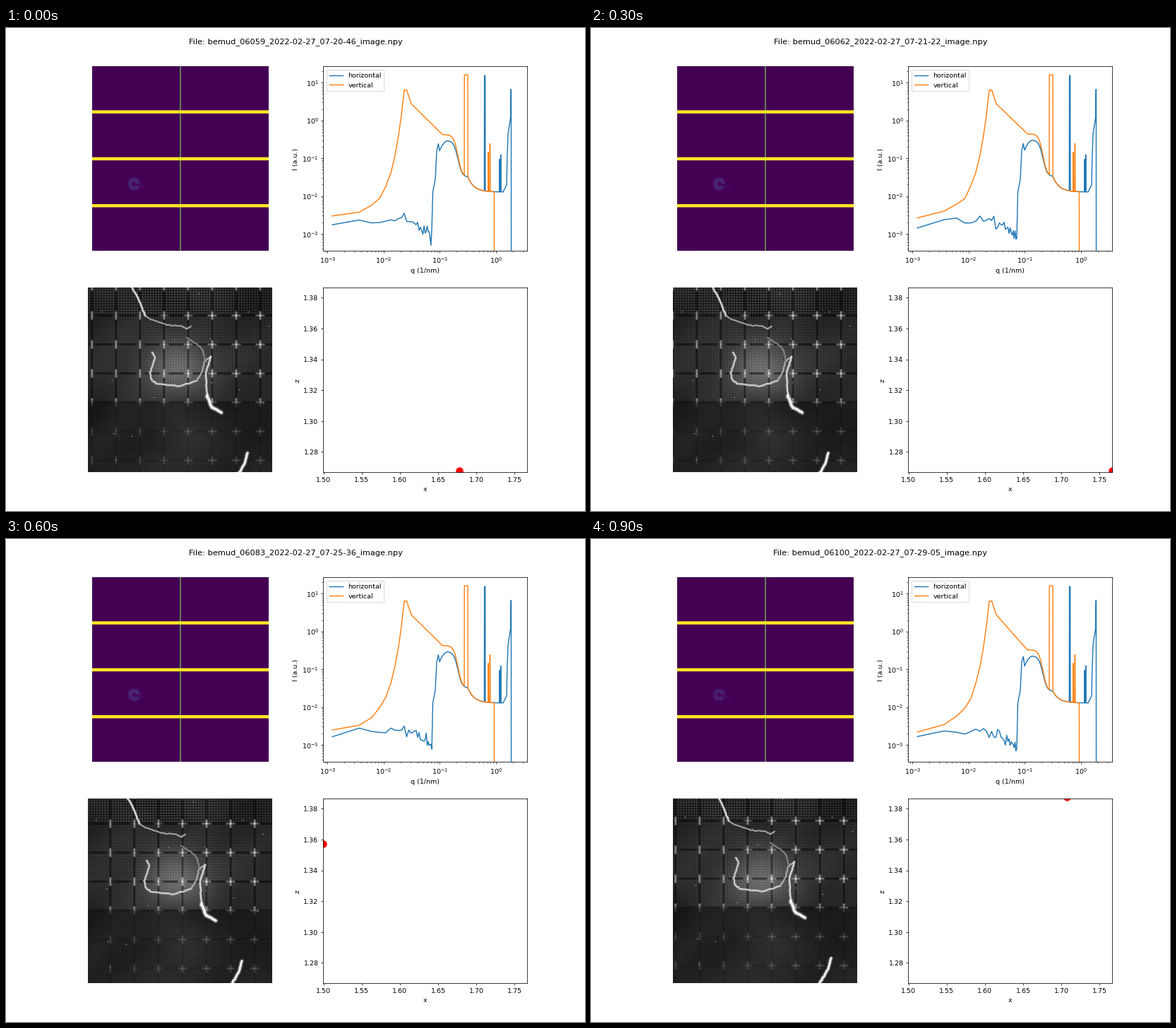
A matplotlib script for the animation above (1 s loop, 820 by 683 pixels).

```python
import matplotlib.pyplot as plt
import numpy as np
from matplotlib.animation import FuncAnimation
from matplotlib.patches import Rectangle

DPI = 820 / 12
PT = 72 / DPI  # points per pixel
MID = 246.93   # centre of the left column
TOP, BASE = 367.64, 628.36
CAM_X = (MID - 130.4, MID + 130.4)

# scan number, clock, signal lift in pixels on the log axis
RUNS = [
    (6059, "07-20-46", 0), (6060, "07-20-57", 0), (6061, "07-21-10", 0),
    (6062, "07-21-22", 1), (6063, "07-21-34", 12), (6073, "07-23-35", 2),
    (6083, "07-25-36", 0), (6084, "07-25-48", -9), (6091, "07-27-14", -7),
    (6100, "07-29-05", -6),
]

# Filaments in the camera view: width, grey level, key points
STRANDS = [
    (2.2, 0.92, [(173, 358), (184, 376), (189, 386), (197, 407)]),
    (1.5, 0.72, [(197, 407), (205, 412), (228, 420), (249, 422), (256, 426),
                 (262, 422)]),
    (2.0, 0.85, [(207, 459), (211, 466), (204, 488), (206, 497), (213, 503),
                 (244, 507), (270, 499)]),
    (1.7, 0.72, [(270, 499), (277, 488), (281, 472), (290, 465)]),
    (1.7, 0.55, [(256, 438), (274, 449), (280, 460), (282, 472)]),
    (2.2, 0.88, [(290, 465), (283, 488), (285, 520)]),
    (3.8, 1.0, [(285, 520), (291, 536), (305, 544)]),
    (3.2, 1.0, [(342, 601), (337, 619), (325, 638)]),
]


def q_of(x):
    return 10 ** ((np.asarray(x) - 694) / 79.5)


def intensity_of(y):
    return 10 ** ((131 - np.asarray(y)) / 53.35)


def bin_x(k):
    """Stage x of the k-th q bin."""
    return 694 + 79.5 * np.log10(0.00243 * (k + 0.5))


def logistic(t):
    return 1 / (1 + np.exp(-np.clip(t, -50, 50)))


def falloff(x, plateau, lift):
    """Plateau, drop to a knee, then decay to the background level."""
    plateau, knee = plateau - lift, 211 - 0.8 * lift
    decay = 1 - np.exp(-np.clip(x - 654, 0, None) / 9)
    return (plateau + (knee - plateau) * logistic((x - 640) / 3)
            + (232 - knee) * decay)


def add_spikes(x, y, spikes):
    for start, width, height in spikes:
        y[(x >= start) & (x <= start + width)] = height


def blue_curve(i):
    number, _, lift = RUNS[i]
    rng = np.random.default_rng(number)
    k = np.arange(30)
    low = 272 + 22 * np.clip((k - 9) / 20, 0, 1)
    low += rng.normal(0, 1, k.size) * np.where(k < 9, 3, 5)
    low[0] += 10

    x = np.arange(614, 715.6, 0.2)
    y = falloff(x, 159.5, lift) + 0.1 * np.clip(626 - x, 0, None) ** 2
    add_spikes(x, y, [(677.6, 1.2, 67.5), (699, 0.5, 186), (700.5, 0.5, 179.5)])
    end = x > 704
    y[end] = np.interp(x[end], [704, 709, 709.6, 711, 714.6, 715.2],
                       [232, 222, 190, 150, 127, 87])
    y[-1] = 400
    rise = [604.5, 608, 610, 612.3], [232, 214, 174, 164 - 0.4 * lift]
    return np.r_[bin_x(k), rise[0], x], np.r_[low, rise[1], y]


def orange_curve(i):
    number, _, lift = RUNS[i]
    rng = np.random.default_rng(number + 1)
    d = np.arange(9, 0, -1)
    rise = 89 + 36 * d - 1.8 * d ** 2 + rng.normal(0, 1, 9) * d ** 2 / 20

    x = np.arange(574, 691.6, 0.2)
    y = falloff(x, 151, lift)
    slope = x < 618
    y[slope] = np.interp(x[slope], [574, 618], [107.5, 151 - lift])
    add_spikes(x, y, [(649.2, 5, 66.5), (682.9, 0.5, 176), (685.2, 0.5, 164)])
    y[-1] = 400
    return (np.r_[bin_x(9 - d), 564, 567.5, 570.5, x],
            np.r_[rise, 88, 88, 97, y])


def scatter_spot(i):
    """Scattering ring around the beam stop on the detector."""
    strength = 10 ** (RUNS[i][2] / 53.35)
    x, y = np.meshgrid(np.linspace(-21, 21, 84), np.linspace(-21, 21, 84))
    r = np.hypot(x, y)
    grain = np.random.default_rng(7).uniform(0.5, 1.5, r.shape)
    ring = 0.12 * min(strength, 1) * np.exp(-((r - 5.5) / 3) ** 2) * grain
    excess = max(0, strength - 1.1)
    halo = excess * (0.2 * (r < 16.5) + 0.25 * np.exp(-(r / 5) ** 2))
    arm = (x > 0) & (abs(y - 0.25 * x) < 1.8) & (r < 18)
    return np.where(arm, 0.02, ring + halo)


def camera_shift(number):
    row, col = divmod(number - 6054, 10)
    return -2.0 * (col - 5), -2.05 * row


def camera_view(dx, dy):
    """Grey image of the perforated, lit membrane."""
    u, v = np.meshgrid(np.linspace(*CAM_X, 522), np.linspace(TOP, BASE, 522))
    x, y = u - dx, v - dy
    upper = logistic((529 - y) / 0.8)
    top = logistic((405 - y) / 1.2)
    middle, lower = upper * (1 - top), 1 - upper
    glow = np.exp(-((u - 237) / 42) ** 2 - ((v - 487) / 34) ** 2)
    wide = np.exp(-((u - 245) / 95) ** 2 - ((v - 475) / 65) ** 2)
    cone = np.exp(-((x - 245) / (18 + 0.9 * np.clip(y - 520, 0, 130))) ** 2)
    blotch = (np.sin(x / 19 + 1.3 * np.sin(y / 23))
              + np.sin(y / 17 + 1.7 * np.sin(x / 29 + 1)))

    grey = 24 + middle * (8 + 26 * wide + 42 * glow)
    grey += lower * (2 + 14 * cone) + 3 * blotch
    holes = (0.25 * (1 + np.cos(2 * np.pi * (x - 122) / 3.79))
             * (1 + np.cos(2 * np.pi * (y - 407) / 3.73))) ** 1.3
    edge = 0.5 + 0.5 * np.exp(-((u - 225) / 90) ** 2)
    grey += holes * (100 * top * edge + middle * (14 + 20 * wide) + 10 * lower)

    # Registration grid: dark lines with pale crosses where they meet
    gx = abs((x - 122 + 17.05) % 34.1 - 17.05)
    gy = abs((y - 407 + 20.5) % 41 - 20.5)
    grey *= np.where((gx < 1.2) | (gy < 1.4), 0.5 + 0.35 * lower, 1)
    side = np.clip((x - 150) / 130, 0.15, 1)
    arms = (np.exp(-(gx / 1.5) ** 4) * (gy < 6) * (35 + 90 * upper)
            + np.exp(-(gy / 1.5) ** 4) * (gx < 6.5) * side * (40 + 55 * upper))
    grain = np.random.default_rng(3)
    grey += arms * grain.uniform(0.6, 1.1, grey.shape)
    grey += grain.normal(0, 3, grey.shape)
    return np.clip(grey, 0, 255)


def rough(points, seed):
    """Subdivide a polyline and add a slight wobble."""
    p = np.array(points, float)
    t = np.linspace(0, len(p) - 1, 6 * len(p))
    fine = np.array([np.interp(t, np.arange(len(p)), c) for c in p.T]).T
    wobble = np.random.default_rng(seed).normal(0, 0.4, fine.shape)
    wobble[[0, -1]] = 0
    return fine + wobble


def block(x, y, w, h, color, z):
    det.add_patch(Rectangle((x, y), w, h, color=color, lw=0, zorder=z,
                            snap=False))


fig, ((det, curve), (cam, stage)) = plt.subplots(2, 2, figsize=(12, 10), dpi=DPI)
fig.subplots_adjust(top=0.92, bottom=0.08)
title = fig.suptitle("")

# Detector: four module rows split by bright gaps
spot = det.imshow(scatter_spot(0), cmap="viridis", vmin=0, vmax=1,
                  extent=(160.5, 202.5, 242, 200), zorder=1)
block(100, 40, 300, 300, "#440154", 0)
for x, y in np.random.default_rng(5).uniform((125, 58), (368, 312), (10, 2)):
    block(x, y, 1, 1, "#46206a", 2)
block(246.4, 50, 1.2, 270, "#7ad151", 2)
for gap in range(3):
    block(100, 116.6 + 66.3 * gap, 300, 4.5, "#fde725", 3)
det.set(xlim=(MID - 124.55, MID + 124.55), ylim=(315.36, 54.64), aspect="equal")
det.axis("off")

# Line profiles
blue, = curve.loglog([1], [1], label="horizontal")
orange, = curve.loglog([1], [1], label="vertical")
curve.set(xlim=q_of([449.14, 738]), ylim=intensity_of([315.36, 54.64]),
          xlabel="q (1/nm)", ylabel="I (a.u.)")
curve.legend(loc="upper left")

# Camera
view = cam.imshow(np.zeros((522, 522)), cmap="gray", vmin=0, vmax=255,
                  extent=(*CAM_X, BASE, TOP))
moving = []
for seed, (width, level, points) in enumerate(STRANDS):
    path = rough(points, seed)
    for scale, alpha in ((1.9, 0.25), (1, 0.9)):
        line, = cam.plot([], [], color=str(level), lw=width * scale * PT,
                         alpha=alpha, solid_capstyle="round")
        moving.append((line, path))
specks, = cam.plot([], [], "o", color="0.6", ms=1.6 * PT, mew=0)
moving.append((specks, np.random.default_rng(11).uniform(
    (CAM_X[0], TOP), (CAM_X[1], BASE), (16, 2))))
cam.set(xlim=CAM_X, ylim=(BASE, TOP), aspect="equal")
cam.axis("off")

# Stage position
marker, = stage.plot([], [], "ro", ms=10)
stage.set(xlim=(1.4995, 1.7665), ylim=(1.2667, 1.3864), xlabel="x", ylabel="z")


def update(i):
    number, clock, _ = RUNS[i]
    title.set_text(f"File: bemud_{number:05d}_2022-02-27_{clock}_image.npy")
    spot.set_data(scatter_spot(i))
    for line, (x, y) in ((blue, blue_curve(i)), (orange, orange_curve(i))):
        line.set_data(q_of(x), intensity_of(y))
    shift = camera_shift(number)
    view.set_data(camera_view(*shift))
    for line, path in moving:
        line.set_data(*(path + shift).T)
    row, col = divmod(number - 6053, 10)
    marker.set_data([1.4998 + 0.02965 * col], [1.2677 + 0.0299 * row])
    return title, spot, blue, orange, view, marker


anim = FuncAnimation(fig, update, frames=len(RUNS), interval=100, repeat=True)
plt.show()
```
